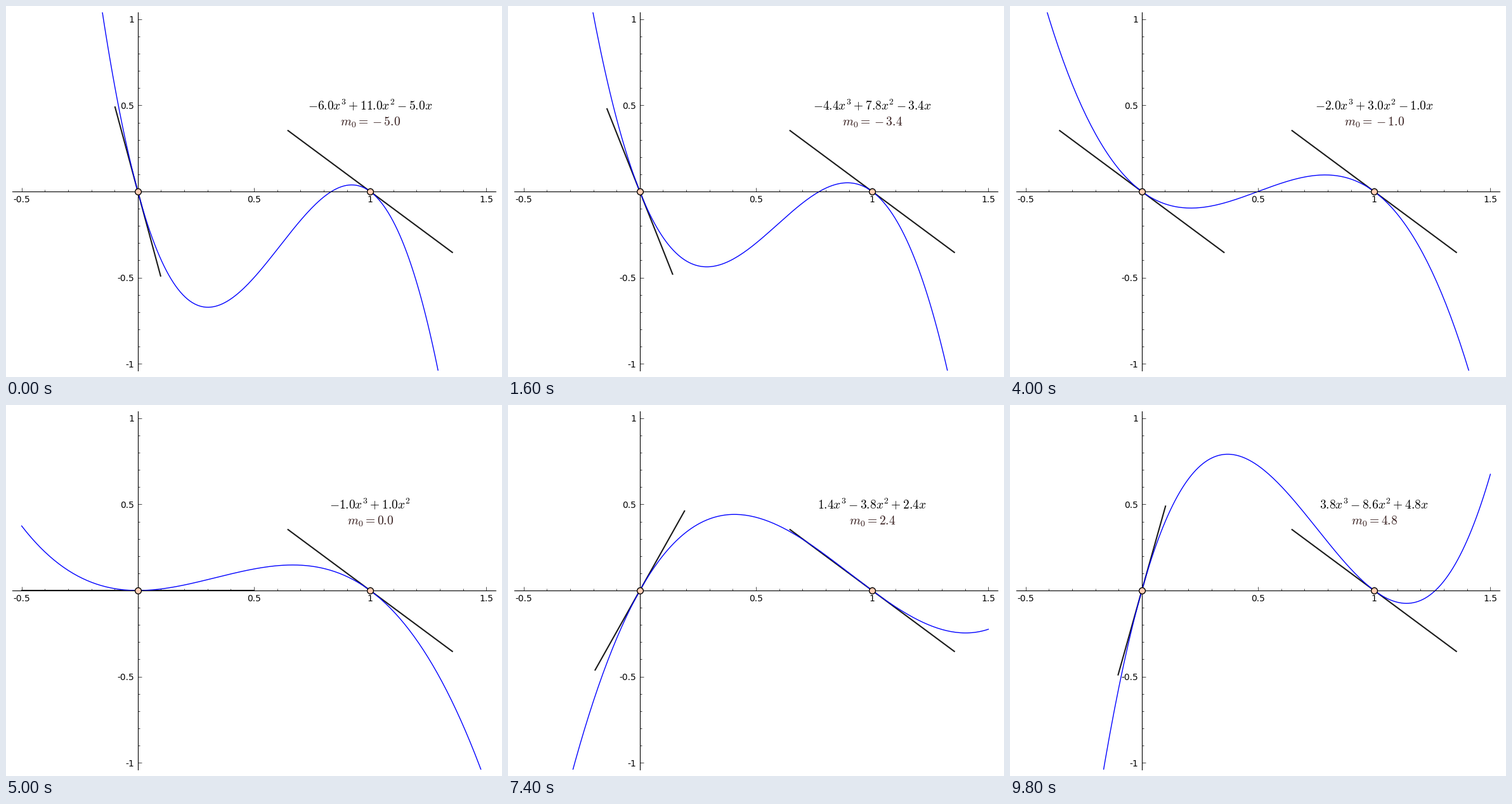
A matplotlib script for the animation above (10000 ms loop, 782 by 584 pixels).

```python
import numpy as np
import matplotlib.pyplot as plt
from matplotlib.animation import FuncAnimation

W, H, DPI = 782, 584, 100
FRAMES, INTERVAL = 50, 200
MARGIN = 10

plt.rcParams["font.family"] = "DejaVu Sans"
plt.rcParams["mathtext.fontset"] = "cm"

fig = plt.figure(figsize=(W / DPI, H / DPI), dpi=DPI, facecolor="white")
ax = fig.add_axes([MARGIN / W, MARGIN / H,
                   1 - 2 * MARGIN / W, 1 - 2 * MARGIN / H])
ax.set(xlim=(-0.54, 1.54), ylim=(-1.04, 1.04))
ax.patch.set_visible(False)

for side in ("top", "right"):
    ax.spines[side].set_visible(False)
for side in ("left", "bottom"):
    ax.spines[side].set_position("zero")
    ax.spines[side].set_linewidth(0.8)


def set_ticks(axis, lo, hi):
    major = [v for v in np.arange(lo, hi + 0.1, 0.5) if v]
    axis.set_ticks(major, [f"{v:g}" for v in major])
    axis.set_ticks(np.arange(round(lo * 10), round(hi * 10) + 1) / 10, minor=True)


set_ticks(ax.xaxis, -0.5, 1.5)
set_ticks(ax.yaxis, -1.0, 1.0)
ax.tick_params(which="both", direction="in", width=0.5)
ax.tick_params(which="major", length=4, pad=4, labelsize=10)
ax.tick_params(which="minor", length=2)

xs = np.linspace(-0.5, 1.5, 200)
DARK = (0.1, 0.1, 0.1)


def tangent_ends(x0, slope):
    """Unit-length segment centred on (x0, 0)."""
    dx = 0.5 / np.hypot(1, slope)
    return [x0 - dx, x0 + dx], [-slope * dx, slope * dx]


curve, = ax.plot([], [], color="blue", lw=1, zorder=2)
left_tangent, = ax.plot([], [], color=DARK, lw=1.5, zorder=1.9)
ax.plot(*tangent_ends(1, -1), color=DARK, lw=1.5, zorder=1.9)
ax.scatter([0, 1], [0, 0], s=50, facecolor="#ffccb3", edgecolor="black",
           linewidth=1, zorder=5)

label = dict(ha="center", va="center", fontsize=14)
formula = ax.text(1, 0.5, "", color="black", **label)
slope_text = ax.text(1, 0.4, "", color=(0.2, 0.1, 0.1), **label)


def poly_tex(coeffs):
    tex = ""
    for c, power in zip(coeffs, ("x^3", "x^2", "x")):
        if abs(c) < 0.05:
            continue
        sign = "-" if c < 0 else "+" if tex else ""
        tex += f"{sign}{abs(c):.1f}{power}"
    return f"${tex}$"


def slope_tex(m):
    sign = r"\hspace{0.2}{-}\hspace{0.2}" if m < 0 else ""
    return f"$m_0={sign}{abs(m):.1f}$"


def update(i):
    m = (i - 25) / 5
    a, b = m - 1, 1 - 2 * m
    curve.set_data(xs, ((a * xs + b) * xs + m) * xs)
    left_tangent.set_data(*tangent_ends(0, m))
    formula.set_text(poly_tex((a, b, m)))
    slope_text.set_text(slope_tex(m))
    return curve, left_tangent, formula, slope_text


anim = FuncAnimation(fig, update, frames=FRAMES, interval=INTERVAL,
                     repeat=True, repeat_delay=0)
plt.show()
```
